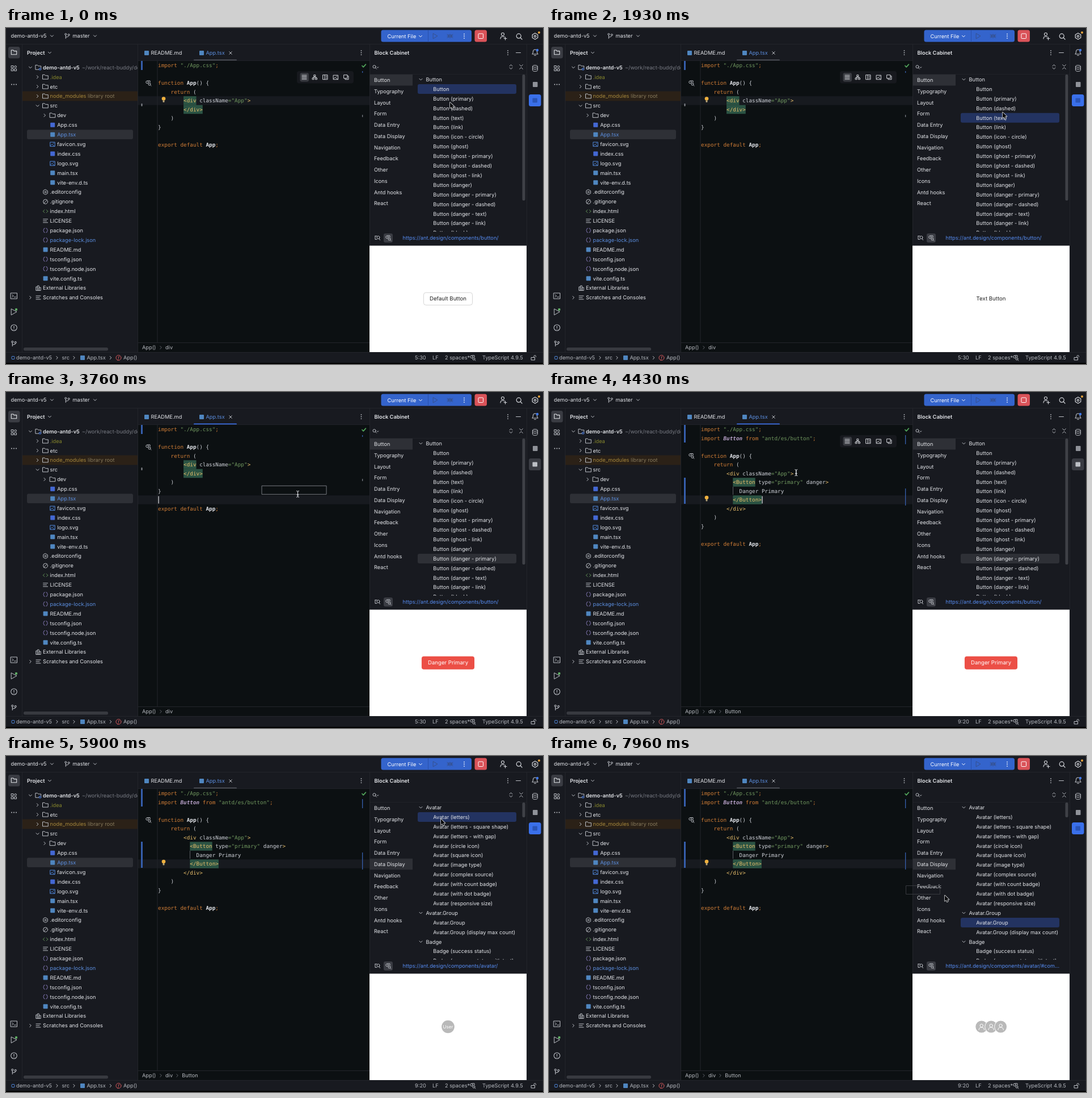
An HTML page with a canvas for the animation above (8 s loop, 947 by 592 pixels).

```html
<!DOCTYPE html>
<html lang="en">
<head>
<meta charset="utf-8">
<title>Component drawer demo</title>
<style>
html, body { margin: 0; width: 100%; height: 100%; overflow: hidden; background: #000; }
canvas { display: block; width: 947px; height: 592px; }
</style>
</head>
<body>
<canvas id="stage" width="947" height="592"></canvas>
<script>
const g = document.getElementById('stage').getContext('2d');
const LOOP = 8000, ROW = 16.9, LINE = 15.5, CHAR = 5.63;
const UI = '9.24px Inter, sans-serif', BOLD = '600 ' + UI;
const MONO = '9.36px "DejaVu Sans Mono", monospace';
const C = {
  panel: '#181a20', edit: '#0c1012', edge: '#23252b', text: '#e3e5e9', dim: '#777a82', icon: '#bdc0c6',
  blue: '#3464cc', sel: '#233361', grey: '#2e3036', link: '#568cf2', mod: '#5c8fe0', file: '#4f86c0', mark: '#365fad'
};

// ---- drawing helpers ----
function text(s, x, y, color = C.text, font = UI, align = 'left') {
  g.font = font; g.fillStyle = color; g.textAlign = align;
  g.fillText(s, x, y + 3.3);
}
function box(x, y, w, h, color, r = 0) {
  g.fillStyle = color; g.beginPath(); g.roundRect(x, y, w, h, r); g.fill();
}
function frame(x, y, w, h, color, r = 0, dash = []) {
  g.strokeStyle = color; g.lineWidth = 1; g.setLineDash(dash);
  g.beginPath(); g.roundRect(x, y, w, h, r); g.stroke(); g.setLineDash([]);
}
function icon(d, x, y, color = C.icon, fill = false, w = 1) {
  g.save(); g.translate(x, y);
  g.strokeStyle = g.fillStyle = color; g.lineWidth = w; g.lineJoin = g.lineCap = 'round';
  const p = new Path2D(d);
  fill ? g.fill(p) : g.stroke(p);
  g.restore();
}
const ring = (r, x = 0, y = 0) => `M${x + r} ${y}a${r} ${r} 0 1 0 ${-2 * r} 0a${r} ${r} 0 1 0 ${2 * r} 0`;
function clip(x, y, w, h, draw) {
  g.save(); g.beginPath(); g.rect(x, y, w, h); g.clip(); draw(); g.restore();
}

const I = {
  down: 'M-2.5-1.2 0 1.3 2.5-1.2', right: 'M-1.2-2.5 1.3 0-1.2 2.5',
  folder: 'M-4.7-4h3.3l1.5 1.6h4.6v6.2h-9.4z',
  gear: ring(1.4) + 'M0-4.4 3.8-2.2 3.8 2.2 0 4.4-3.8 2.2-3.8-2.2z',
  none: ring(4) + 'M-2.8 2.8 2.8-2.8', code: 'M-1.5-2.5-4.5 0l3 2.5M1.5-2.5 4.5 0l-3 2.5',
  lines: 'M-4-3h8M-4 0h6M-4 3h8',
  json: 'M-1.3-3.8q-1.7 0-1.7 1.7t-1 2q1 .3 1 2t1.7 1.7M1.3-3.8q1.7 0 1.7 1.7t1 2q-1 .3-1 2t-1.7 1.7',
  image: 'M-4-3.5h8v7.5h-8zM-4 3 -1 0l4.5 4M1.2-1.6h1',
  libs: 'M-4.2 4v-6h2.6v6zM-1.6 4v-8h2.8v8zM1.2 4v-5h3v5z',
  dots: ring(.9, 0, -3.6) + ring(.9) + ring(.9, 0, 3.6),
  search: ring(4, -.8, -.8) + 'M2.2 2.2 5 5', lens: ring(2.5, -1, -.8) + 'M1 1.2 3 3.2',
  branch: ring(1.5, -2.7, -3) + ring(1.5, 2.7, -2) + 'M-2.7-1.5v6M2.7-.5q0 2.5-5.4 2.5',
  play: 'M-3.5-4.5 4 0-3.5 4.5z', cross: 'M-2.3-2.3 2.3 2.3M2.3-2.3-2.3 2.3',
  rows: 'M-4-3.5h8M-4-1.2h8M-4 1.2h8M-4 3.5h8', tree: 'M-1.3-4h2.6v2.6h-2.6zM-4 1.4h2.6v2.6h-2.6zM1.4 1.4h2.6v2.6h-2.6zM0-1.4v1.4M-2.7 1.4v-1.4h5.4v1.4',
  cols: 'M-4-4h8v8h-8zM-1-4v8M1-1.5h2M1 1.5h2', copy: 'M-4-4h6v6h-6zM-2 2v2h6v-6h-2',
  find: ring(2.2, -2, -1.6) + ring(2, 2, 2) + 'M-1-4h4v3M4 4 5 5',
  arrow: 'M0 0v10.2l2.4-2.2 1.6 3.6 1.8-.8-1.6-3.4h3.2z'
};
const square = (x, y, color = C.file) => box(x - 4, y - 4, 8, 8, color, 1);

// ---- data ----
// level, icon, label, optional colour, optional chevron
const files = [
  [0, 'folder', 'demo-antd-v5', '', 'down'], [1, 'folder', '.idea', '#86862c', 'right'], [1, 'folder', 'etc', '', 'right'],
  [1, 'folder', 'node_modules', '#a5873c', 'right'], [1, 'folder', 'src', '', 'down'], [2, 'folder', 'dev', '', 'right'],
  [2, 'css', 'App.css'], [2, 'ts', 'App.tsx', C.mod], [2, 'image', 'favicon.svg'], [2, 'css', 'index.css'],
  [2, 'image', 'logo.svg'], [2, 'ts', 'main.tsx'], [2, 'ts', 'vite-env.d.ts'], [1, 'gear', '.editorconfig'],
  [1, 'none', '.gitignore'], [1, 'code', 'index.html'], [1, 'lines', 'LICENSE'], [1, 'json', 'package.json'],
  [1, 'json', 'package-lock.json', C.mod], [1, 'ts', 'README.md'], [1, 'json', 'tsconfig.json'],
  [1, 'json', 'tsconfig.node.json'], [1, 'ts', 'vite.config.ts'], [0, 'libs', 'External Libraries'],
  [0, 'lines', 'Scratches and Consoles', '', 'right']
];
const groups = ['Button', 'Typography', 'Layout', 'Form', 'Data Entry', 'Data Display', 'Navigation', 'Feedback',
  'Other', 'Icons', 'Antd hooks', 'React'];
const wrap = (name, kinds) => kinds.split(',').map(k => `${name} (${k})`);
const buttons = ['#Button', 'Button', ...wrap('Button', 'primary,dashed,text,link,icon - circle,ghost,ghost - primary,' +
  'ghost - dashed,ghost - link,danger,danger - primary,danger - dashed,danger - text,danger - link,block')];
const avatars = ['#Avatar', ...wrap('Avatar', 'letters,letters - square shape,letters - with gap,circle icon,square icon,' +
  'image type,complex source,with count badge,with dot badge,responsive size'), '#Avatar.Group', 'Avatar.Group',
  'Avatar.Group (display max count)', '#Badge', ...wrap('Badge', 'success status,success status with text')];
const labels = { 1: 'Default Button', 2: 'Primary Button', 3: 'Dashed Button', 4: 'Text Button', 12: 'Danger Primary' };

// ---- timeline ----
const FOCUS_EDITOR = 3630, DROP = 4200, TOOLS_ON = 4400, GROUP = 5360, LIST = 5430, TOOLS_OFF = 5600, PICK = 5830;
const picks = [[0, 1], [40, 2], [560, 3], [1300, 4], [3030, 12], [LIST, 0], [PICK, 1], [7200, 12]];
const path = [
  [0, 783, 131], [30, 783, 131], [230, 786, 134], [430, 786, 134], [700, 788, 142], [860, 788, 142], [1160, 802, 159],
  [1660, 800, 160], [1700, 800, 160], [1960, 800, 147], [2160, 800, 147], [2400, 800, 165], [2600, 800, 195],
  [2800, 800.5, 239], [2930, 805, 286], [3230, 805, 286], [3460, 804, 292], [3630, 804, 292], [3670, 715, 245],
  [3760, 515, 180], [3900, 450, 150], [4200, 425, 140], [4400, 425, 140], [4800, 565, 168], [5200, 675.5, 188],
  [5420, 675.5, 188], [5650, 715, 150], [5870, 767, 111], [6200, 767, 111], [6430, 771, 155], [6600, 771, 155],
  [7000, 785, 235], [7260, 798, 288], [7460, 798, 288], [7730, 803, 292], [7915, 803, 292], [7960, 698, 245.5], [8000, 698, 245.5]
];
const pickAt = t => picks.filter(p => p[0] <= t).pop()[1];
function mouseAt(t) {
  const i = path.findIndex(p => p[0] > t), [t0, x0, y0] = path[i - 1], [t1, x1, y1] = path[i];
  const k = (t - t0) / (t1 - t0);
  return [x0 + (x1 - x0) * k, y0 + (y1 - y0) * k];
}

// ---- parts ----
function topBar() {
  text('demo-antd-v5', 8.5, 14); icon(I.down, 81, 14);
  icon(I.branch, 108, 14); text('master', 117.5, 14); icon(I.down, 157, 14);
  box(661.5, 3.5, 159.5, 21, C.blue, 3.5);
  text('Current File', 672.5, 14.3, '#fff'); icon(I.down, 731, 14.5, '#fff');
  box(744, 4, 1, 20.5, '#2a51ac');
  icon(I.play, 757, 14.2, '#36508c');
  icon(ring(3) + 'M-5-3 5 3M-5 3 5-3M-5 0h10', 783, 14.2, '#36508c');
  icon(I.dots, 808, 14.2, '#fff', true);
  box(826.5, 3.5, 21.5, 21, '#da5359', 3.5); frame(833, 10, 8.5, 8.5, '#fff', 1);
  icon(ring(2.5, -1, -3) + 'M-5 5q0-4 4-4 2 0 3 1M3.5 2v5M1 4.5h5', 877, 14, '#d3d5da', false, 1.1);
  icon(I.search, 905, 15, '#d3d5da', false, 1.2);
  g.save(); g.translate(933, 14.5); g.scale(1.25, 1.25); icon(I.gear, 0, 0, '#d3d5da'); g.restore();
  icon(ring(2), 940, 8, '#e5a23c', true);
}

function sideBars(active) {
  box(4, 33, 20.5, 20.5, '#3a3c43', 3.5);
  icon(I.folder, 14, 43, '#e0e2e6', false, 1.1);
  icon('M-4.5-4.5h3.5v3.5h-3.5zM-4.5 1h3.5v3.5h-3.5zM1 1h3.5v3.5h-3.5z' + ring(1.8, 2.7, -2.7), 14, 71);
  icon(ring(1, -4) + ring(1) + ring(1, 4), 14, 99.5, C.icon, true);
  icon('M-5.5-5h11v10h-11zM-3-2l2 2-2 2M.5 2h3', 14, 472);
  icon('M-4.5-5 5 0-4.5 5.5z', 14, 500); icon(ring(2.2), 18, 496, '#5fad65', true);
  icon(ring(5.3) + 'M0-2.8v3.4M0 2.6v.2', 14, 528, C.icon, false, 1.1);
  icon(I.branch, 14, 556, C.icon, false, 1.1);
  icon('M-5 3q1.5-1.5 1.5-4 0-4 3.5-4t3.5 4q0 2.5 1.5 4zM-1.5 5.3h3', 933, 43, C.icon, false, 1.1);
  icon(ring(2.2), 937, 39, '#3f78ee', true);
  icon('M-4.5-3.5q0-1.8 4.5-1.8t4.5 1.8v7q0 1.8-4.5 1.8t-4.5-1.8zM-4.5-3.5q0 1.7 4.5 1.7t4.5-1.7M-4.5-.2q0 1.7 4.5 1.7t4.5-1.7', 933, 71);
  box(929, 95, 8.5, 9, '#8f9299', 1);
  box(922, 117, 21.5, 21, active ? '#3a70ea' : '#3a3c43', 3.5);
  box(928.5, 123.5, 8.5, 8, active ? '#2a55b8' : C.icon, 1);
}

function project() {
  text('Project', 37, 43.3, C.text, BOLD); icon(I.down, 77, 43.5);
  clip(29, 58, 203, 500, () => files.forEach(([lv, ic, name, color, chev], i) => {
    const y = 69.4 + i * ROW, x = 57 + lv * 12.6;
    if (i == 3) box(29, y - 8.5, 203, ROW, '#2b2117');
    if (i == 7) box(37, y - 8.5, 187, ROW, C.grey, 3);
    if (chev) icon(I[chev], x - 14, y, C.icon);
    if (ic == 'ts' || ic == 'css') square(x, y, ic == 'css' ? '#4468d4' : C.file);
    else icon(I[ic], x, y, ic == 'image' ? '#4f86d8' : ic == 'code' ? '#5d8a55' : ic == 'json' ? '#8b7fc0' : C.icon);
    text(name, x + 8, y, color || C.text, i ? UI : BOLD);
    if (!i) { box(x + 1, y + 1, 4, 4, C.panel); frame(x + 1.5, y + 1.5, 3, 3, '#5286ea'); text('~/work/react-buddy/demo-antd-v5', 134, y, C.dim); }
    if (i == 3) text('library root', 144, y, '#877a5c');
  }));
  box(31, 563, 149, 5.5, '#383a40', 2.5);
}

const inks = { k: '#d07d36', s: '#6f965e', t: '#e6bd6a', p: '#cdd0d7', b: '#e3e5ea', i: '#b7a0c8' };
// first letter of each piece picks its ink
function codeLine(n, indent, ...parts) {
  let x = 268 + indent * CHAR;
  for (const part of parts) {
    const ink = part[0], s = part.slice(1);
    text(s, x, 66 + n * LINE, inks[ink], (ink == 'b' ? 'bold ' : ink == 'i' ? 'italic bold ' : '') + MONO);
    x += s.length * CHAR;
  }
}
const mark = (n, indent, len) => box(268 + indent * CHAR, 58.2 + n * LINE, len * CHAR, LINE, '#2b5343');

function editor(t) {
  const done = t >= DROP, drag = t >= FOCUS_EDITOR && !done, far = t >= 3690 && t < 3800;
  box(233, 58, 408, 513, C.edit);
  const row = done || far ? 8 : 4;
  box(233, 58.2 + row * LINE, 408, LINE, '#171a1f');
  box(266.5, 58, 1, 496, '#22252a');
  box(238, 58, 3, done ? 31 : 16, C.mark);
  if (done) { box(238, 151, 3, 46, C.mark); mark(6, 10, 7); mark(8, 10, 9); box(324, 167, 1, 14, '#5a5d63'); }
  else { mark(4, 8, 4); mark(5, 8, 6); box(238.5, 133, 2, 5, '#8a8d93', 1); }

  let n = 0;
  codeLine(n++, 0, 'kimport ', 's"./App.css"', 'k;');
  if (done) codeLine(n++, 0, 'kimport ', 'iButton ', 'kfrom ', 's"antd/es/button"', 'k;');
  n++;
  icon(I.find, 251, 66 + n * LINE);
  codeLine(n++, 0, 'kfunction ', 'bApp', 'p() {');
  codeLine(n++, 4, 'kreturn ', 'p(');
  codeLine(n++, 8, 't<div ', 'pclassName', 's="App"', 't>');
  if (done) {
    codeLine(n++, 10, 't<Button ', 'ptype', 's="primary" ', 'pdanger', 't>');
    codeLine(n++, 12, 'pDanger Primary');
    codeLine(n++, 10, 't</Button>');
  }
  codeLine(n++, 8, 't</div>');
  codeLine(n++, 4, 'p)');
  codeLine(n++, 0, 'p}');
  codeLine(n + 1, 0, 'kexport default ', 'bApp', 'k;');

  if (drag || done && t < GROUP) {
    const col = far ? 0 : done ? 19 : 29;
    box(268.5 + col * CHAR, 59.5 + row * LINE, 1.2, 13, '#e4e6ea');
  }
  if (!drag) {
    const y = done ? 187 : 125.5;
    icon(ring(3.3), 278, y - 1, '#f0b13e', true); box(276.5, y + 2, 3, 3.5, '#b9a477', 1);
  }
  if (t < FOCUS_EDITOR || t >= TOOLS_ON && t < TOOLS_OFF) {
    box(513, 76, 100, 21.5, '#17191e', 4);
    box(518.5, 79, 15.5, 15.5, '#393b41', 3);
    ['rows', 'tree', 'cols', 'image', 'copy'].forEach((k, i) => icon(I[k], 526 + i * 18.5, 86.7, '#d0d2d7'));
  }
  icon('M-3 0-.8 2.3 3.4-2.4', 631, 66.5, '#4f9f58', false, 1.8);
  if (done) { box(628, 76, 1.3, 16, C.mark); box(628, 170, 1.3, 30, C.mark); }
  else { box(628, 76, 1.3, 3, C.mark); box(628, 153, 1.3, 4, '#777a82'); }

  // tabs
  box(233, 29, 408, 28.5, C.panel);
  square(248, 44); text('README.md', 255.5, 44);
  square(345, 44); text('App.tsx', 352.5, 44, C.mod); icon(I.cross, 396, 44, C.icon);
  box(331, 55.5, 76, 2, t >= FOCUS_EDITOR && t < GROUP ? '#3a70ea' : '#50535a', 1);
  box(233, 57.3, 408, .7, C.edge);
  icon(I.dots, 626.5, 43.5, C.icon, true);

  // breadcrumbs
  box(233, 554, 408, 1, C.edge);
  text('App()', 240, 562.7, '#b6b9bf'); icon(I.right, 273, 563, C.dim, false, .8);
  text('div', 281, 562.7, '#b6b9bf');
  if (done) { icon(I.right, 302, 563, C.dim, false, .8); text('Button', 310.3, 562.7, '#b6b9bf'); }
}

function preview(avatar, pick) {
  const f = '9.65px Inter, sans-serif', x = 779.5, y = 477;
  box(641, 383.5, 277, 187.5, '#fff');
  if (!avatar) {
    const s = labels[pick], solid = { 2: '#3878f6', 12: '#ec4f46' }[pick];
    g.font = f;
    const w = g.measureText(s).width + 22;
    if (solid) box(x - w / 2, 465.7, w, 23, solid, 4);
    else if (pick != 4) frame(x - w / 2 + .5, 466.2, w - 1, 22, '#d6d6d6', 4, pick == 3 ? [2, 1.5] : []);
    text(s, x, y + .1, solid ? '#fff' : '#202020', f, 'center');
  } else if (pick == 1) {
    icon(ring(11.3), x, y, '#b9b9b9', true);
    text('User', x, y, '#fff', '8px Inter, sans-serif', 'center');
  } else for (let i = -1; i < 2; i++) {
    const cx = x + .2 + i * 16.9;
    icon(ring(11.3), cx, y, '#fff', true); icon(ring(10.5), cx, y, '#b9b9b9', true);
    icon(ring(2.7, 0, -2) + 'M-4.7 5.5q0-4.4 4.7-4.4t4.7 4.4', cx, y, '#fff');
  }
}

function palette(t) {
  const avatar = t >= LIST, pick = pickAt(t), rows = avatar ? avatars : buttons;
  text('Block Cabinet', 649.5, 43.3, C.text, BOLD);
  icon(I.dots, 885, 43.5, C.icon, true); icon('M-4 0h8', 903.5, 43.5);
  icon(I.lens, 650.5, 69); icon('M-1.3-.7 0 .7 1.3-.7', 655.5, 69.5);
  icon('M-2.5-1.4 0-3.8 2.5-1.4M-2.5 1.4 0 3.8 2.5 1.4', 890.5, 68.5);
  icon('M-2.8-3.8 0-1 2.8-3.8M-2.8 3.8 0 1 2.8 3.8', 908.5, 68.5);
  box(641, 81, 277, .8, C.edge);
  const group = t < GROUP ? 0 : 5;
  box(641.5, 82 + group * 19.75, 75.5, 19.5, t >= GROUP && t < PICK ? C.sel : C.grey);
  groups.forEach((s, i) => text(s, 649, 91.9 + i * 19.75));
  clip(718, 82, 200, 277, () => {
    if (pick) box(726, 82 + pick * ROW + .2, 174, ROW, t >= FOCUS_EDITOR && t < PICK ? C.grey : C.sel, 3);
    rows.forEach((s, i) => {
      const y = 90.6 + i * ROW, head = s[0] == '#';
      if (head) icon(I.down, 731.5, y);
      text(head ? s.slice(1) : s, head ? 740.5 : 753.3, y);
    });
  });
  box(910.5, 82, 5, avatar ? 26 : 222, '#3f4147', 2);
  icon(ring(2.5, 1.5, -1) + 'M-4-3.5v6h3M3 1l1.5 2.5M-4-3.5h3', 655, 370);
  box(666, 362, 16, 16, '#3a3c43', 3); icon(I.find, 674, 370);
  if (pick) {
    const page = !avatar ? 'button/' : pick == 1 ? 'avatar/' : 'avatar/#com...';
    text('https://ant.design/components/' + page, 699.5, 370, C.link);
    preview(avatar, pick);
  }
}

function statusBar(t) {
  const ink = '#b6b9bf';
  box(0, 571, 947, 1, C.edge);
  frame(10, 578.5, 5, 5, '#4f86d8', 1);
  [['demo-antd-v5', 18], ['src', 98.5], ['App.tsx', 142.5], ['App()', 207], [t < DROP ? '5:30' : '9:20', 721],
    ['LF', 752], ['2 spaces*', 774], ['TypeScript 4.9.5', 840]].forEach(([s, x]) => text(s, x, 580.7, ink));
  [90, 120, 184.5].forEach(x => icon(I.right, x, 581));
  square(135, 581);
  icon(ring(4.5), 198.5, 581, '#d4575c'); text('f', 198.5, 580.7, '#d4575c', 'italic 8px Inter, sans-serif', 'center');
  icon(I.find, 823, 581); icon('M-3.5-.5h6v4.5h-6zM1-.5v-2q0-1.7 1.7-1.7t1.7 1.7v1', 930, 581);
}

function pointer(t) {
  const [x, y] = mouseAt(t);
  if (t > 3700 && t < DROP) frame(x - 63.5, y - 14.5, 114, 15, '#777a80');
  if (t >= 7950) frame(629.5, 228.5, 60, 15, '#383a3f');
  if (x > 233 && x < 641) icon('M-2-5.5q2 0 2 1.5v8q0 1.5-2 1.5M2-5.5q-2 0-2 1.5v8q0 1.5 2 1.5M-1.5 1.5h3', x, y, '#e6e8ec');
  else { icon(I.arrow, x, y, '#d8dadd', false, 1.6); icon(I.arrow, x, y, '#08090b', true); }
}

function draw() {
  const t = performance.now() % LOOP;
  g.textRendering = 'geometricPrecision';
  box(0, 0, 947, 592, '#000');
  box(0, 0, 947, 590, C.panel);
  topBar();
  editor(t);
  project();
  box(0, 28, 947, 1, C.edge);
  [28, 232, 641, 918].forEach(x => box(x, 29, 1, 542, C.edge));
  palette(t);
  sideBars(t < FOCUS_EDITOR || t >= GROUP);
  statusBar(t);
  pointer(t);
  requestAnimationFrame(draw);
}
requestAnimationFrame(draw);
</script>
</body>
</html>
```
